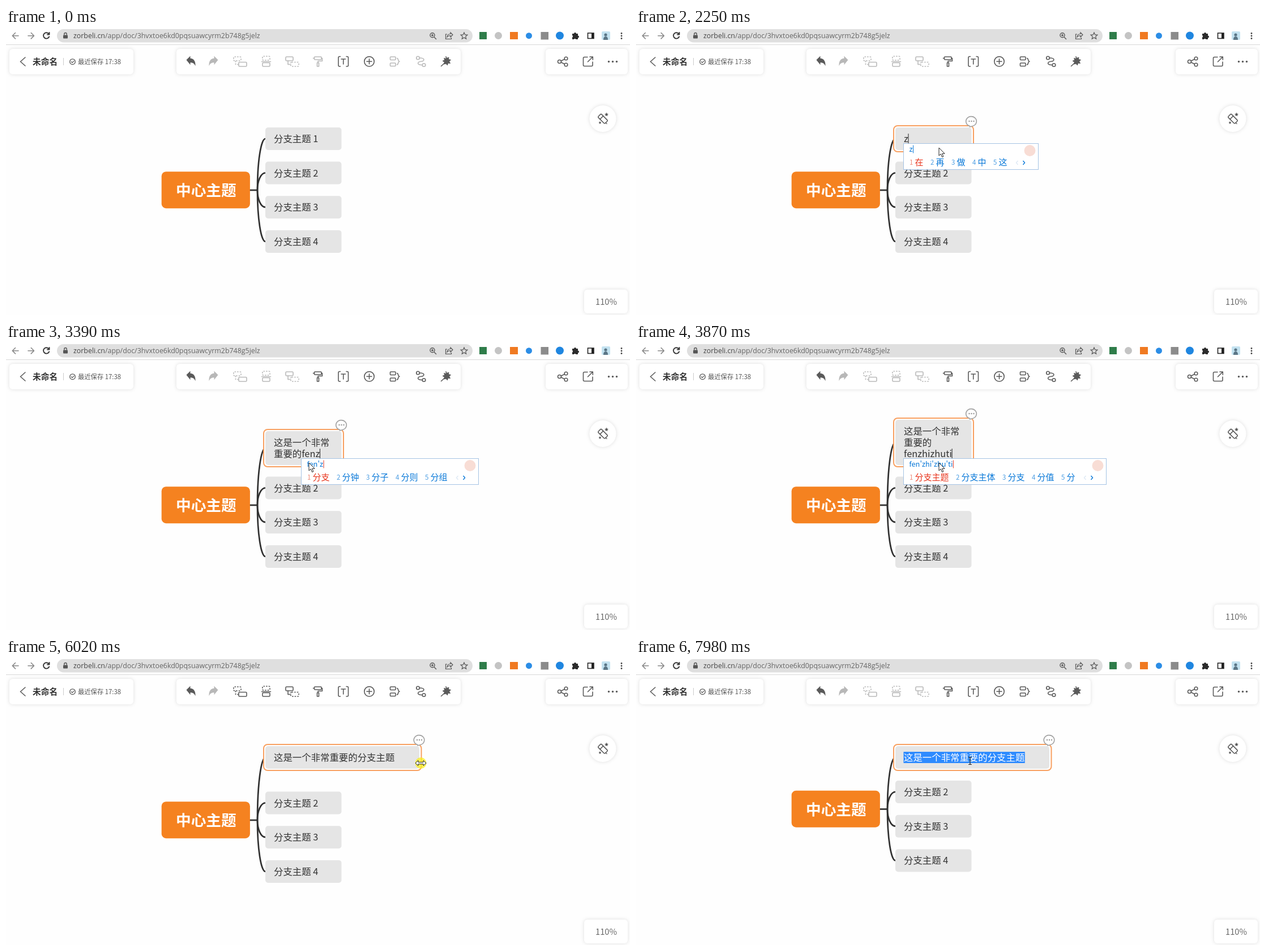
Recreate the animation shown at these times as an HTML page. Size 1102 by 508 pixels, loop 8000 ms.

```html
<!DOCTYPE html>
<html lang="zh-CN">
<head>
<meta charset="utf-8">
<title>Mind map</title>
<style>
html, body { margin: 0; width: 100%; height: 100%; overflow: hidden; background: #fefefe; }
svg { display: block; width: 100%; height: 100%; font-family: "Noto Sans CJK SC", "Noto Sans CJK", sans-serif; font-weight: 350; }
text { white-space: pre; }
.card { fill: #fff; filter: drop-shadow(0 0 3px rgba(0, 0, 0, .13)); }
.ic { fill: none; stroke: #5a5a5a; stroke-width: 1.6; stroke-linecap: round; stroke-linejoin: round; }
.ic .f { fill: #5a5a5a; }
.dim { stroke: #bababa; }
.dim .f { fill: #bababa; }
.dash { stroke-dasharray: 2.6 2; stroke-linecap: butt; }
.nav { stroke-width: 1.6; }
.thin { stroke-width: 1.3; }
</style>
</head>
<body>
<svg viewBox="0 0 1102 508" preserveAspectRatio="none">
  <rect width="1102" height="29" fill="#fff"/>
  <rect y="29" width="1102" height="1" fill="#d8d8d8"/>
  <rect x="90" y="2" width="734" height="23.5" rx="11.7" fill="#dfdfdf"/>
  <g class="ic nav">
    <path stroke="#888" d="M22 13.7H11.5M16.5 8.5l-5.2 5.2 5.2 5.2"/>
    <path stroke="#888" d="M39 13.7h10.5M44.3 8.5l5.2 5.2-5.2 5.2"/>
    <path stroke="#333" stroke-width="1.9" d="M75.5 10.3a5.2 5.2 0 1 0 .7 5M76.5 8v3.6h-3.7"/>
  </g>
  <g fill="none" stroke="#555" stroke-width="1.4">
    <rect x="101" y="12.5" width="8" height="6" fill="#555" stroke="none" rx="1"/>
    <path d="M102.8 12.5v-1.8a2.2 2.2 0 0 1 4.4 0v1.8"/>
    <circle cx="753" cy="12.8" r="4"/>
    <path d="M756 16l4 4M751 12.8h4M753 10.8v4"/>
    <path stroke-width="1.2" d="M779 11h-2.5v8.5h10V17M779 16c.5-4 3-5.5 6-5.5V8l4 4-4 4v-2.5c-2.5 0-4.500.5-6 2.5z"/>
    <path stroke-width="1.2" d="M809 8l1.7 3.900 4.200.4-3.200 2.800 1 4.200-3.700-2.300-3.700 2.300 1-4.200-3.200-2.800 4.200-.4z"/>
  </g>
  <text x="119" y="18" font-size="12.4" font-weight="400" font-family="Open Sans, Noto Sans, sans-serif" fill="#444">zorbeli.cn<tspan fill="#666">/app/doc/3hvxtoe6kd0pqsuawcyrm2b748g5jelz</tspan></text>
  <rect x="836" y="7" width="13" height="13" fill="#2f7d4a"/>
  <circle cx="869.5" cy="13.5" r="6.5" fill="#c4c4c4"/>
  <rect x="890" y="7" width="14" height="13" fill="#f07a22"/>
  <circle cx="923.5" cy="13.7" r="5.5" fill="#2b8de6"/>
  <rect x="944.5" y="7" width="13.5" height="13.5" fill="#8c8c8c"/>
  <circle cx="978" cy="13.5" r="7" fill="#1f86e0"/>
  <path fill="#2b2b2b" d="M1000 10h3a2 2 0 1 1 4 0h3v3.500a2 2 0 1 1 0 4V20h-3.500a2 2 0 0 0-3.500 0h-3v-3.500a2 2 0 0 0 0-3.600z"/>
  <path fill="none" stroke="#222" stroke-width="1.6" d="M1027.5 9h10.5v9.5h-10.5z"/>
  <rect x="1034" y="9" width="4" height="9.5" fill="#222"/>
  <rect x="1052" y="6" width="15" height="15" rx="2" fill="#c3e2f0"/>
  <path fill="#5b7686" d="M1055 21c0-5 2-6 4-6s4 1 4 6z"/><circle cx="1059" cy="12" r="2.6" fill="#5b7686"/>
  <g fill="#444"><circle cx="1087" cy="9.5" r="1.4"/><circle cx="1087" cy="14" r="1.4"/><circle cx="1087" cy="18.5" r="1.4"/></g>

  <g id="map"></g>

  <rect class="card" x="6" y="37" width="219" height="45" rx="6"/>
  <rect class="card" x="301" y="37" width="502" height="45" rx="6"/>
  <rect class="card" x="953" y="37" width="145" height="45" rx="6"/>
  <rect class="card" x="1021" y="463" width="77" height="42" rx="6"/>
  <circle class="card" cx="1054" cy="160.5" r="23.5"/>
  <path class="ic" d="M34 52l-8.5 7.5L34 67"/>
  <text x="47" y="64.5" font-size="14.7" font-weight="700" fill="#333">未命名</text>
  <path stroke="#ccc" d="M101.5 53v13"/>
  <g class="ic thin"><circle cx="117.5" cy="59.7" r="4.8"/><path d="M115.3 59.7l1.7 1.7 3-3"/></g>
  <text x="127" y="63.5" font-size="11.3" fill="#555">最近保存 17:38</text>
  <text x="1060" y="489.5" font-size="14.7" fill="#666" text-anchor="middle">110%</text>

  <path fill="#5a5a5a" d="M318.5 56.5l7-7v4.300c6 .2 9.500 5 9 13.500-2-4.500-4.500-6-9-6v4z"/>
  <path fill="#b8b8b8" d="M374.5 56.5l-7-7v4.300c-6 .2-9.500 5-9 13.500 2-4.500 4.500-6 9-6v4z"/>
  <g class="ic" data-set="insert">
    <rect class="dash" x="402" y="51" width="13" height="7" rx="1.5"/>
    <path class="dash" d="M405.5 58v6.5h6"/><rect x="411" y="60.5" width="14" height="7.5" rx="1.5"/>
    <rect class="dash" x="453" y="50" width="13" height="7" rx="1.5"/>
    <path d="M451.5 59.5h16"/><rect x="453" y="61.5" width="13" height="6.5" rx="1.5"/>
    <rect x="494" y="51" width="13" height="7" rx="1.5"/>
    <path d="M498 58v6.5h4"/><rect class="dash" x="503" y="60.5" width="14" height="7.5" rx="1.5"/>
  </g>
  <g class="ic" data-set="style">
    <rect x="544.5" y="51" width="12.5" height="5" rx="1"/><path d="M544.5 53.5H542.5M557 53.5h1.5v5h-7.5v3"/><rect x="549.5" y="61.5" width="3" height="6.5"/>
    <rect x="678.5" y="51" width="9.5" height="5.5" rx="1"/><rect x="678.5" y="62" width="9.5" height="5.5" rx="1"/>
    <path d="M690.5 53.5c3 0 1 5.7 4.5 5.7-3.5 0-1.5 5.7-4.5 5.7"/>
    <circle cx="727.5" cy="53" r="2.8"/><circle cx="738" cy="65.5" r="2.8"/>
    <path d="M730.5 53c10 0 9 5.8 2.500 6.300s-8.500 6 2 6.200"/>
  </g>
  <g class="ic">
    <path d="M590.5 50.5h-1.5q-2 0-2 2v13.500q0 2 2 2h1.500M601 50.500h1.500q2 0 2 2v13.500q0 2-2 2h-1.500M592 55h7.500M595.750 55v9"/>
    <circle cx="641.5" cy="59.3" r="8.7"/><path d="M637 59.3h9M641.5 54.8v9"/>
    <path d="M768.5 67.5l6-5.5"/>
    <path class="f" stroke-width="1" d="M777 50.5l1.500 3 3.500-1.500-.5 3.500 4 1-3 2.500 2 3.500-4-.5-1 4-2.500-3-3.500 1 .8-3.700-3.300-2 3.700-1.300-1-3.500 3.300 1z"/>
    <circle cx="977.5" cy="59.5" r="3"/><circle cx="989" cy="54" r="2.8"/><circle cx="989" cy="65" r="2.8"/>
    <path d="M980.3 58.2l6-3M980.3 60.8l6 3"/>
    <path d="M1027 51.5h-5.500q-2 0-2 2v12q0 2 2 2h12.500q2 0 2-2V60M1031 51h5.300v5.300M1036 51.300l-8.500 8.500"/>
    <g stroke="none"><circle class="f" cx="1064.5" cy="59.5" r="1.7"/><circle class="f" cx="1071.5" cy="59.5" r="1.7"/><circle class="f" cx="1078.5" cy="59.5" r="1.7"/></g>
    <g transform="rotate(45 1054 160)"><rect x="1046" y="156.5" width="17" height="8" rx="1.5"/><path d="M1051.5 156.5v8"/></g>
    <path class="f" stroke="none" d="M1060.5 149.5l1 2.300 2.400.3-1.800 1.600.5 2.400-2.100-1.200-2.100 1.200.5-2.400-1.800-1.600 2.400-.3zM1049 165l.7 1.600 1.800.2-1.300 1.200.3 1.700-1.500-.8-1.500.8.3-1.700-1.300-1.200 1.800-.2z"/>
    <path class="thin" d="M1059 167.5l2 2"/>
  </g>

  <g id="over"></g>
</svg>
<script>
const LOOP = 8000, FS = 16.42, LEFT = 458, PAD = 15;
const EDIT1 = 1190, PRESS = 5140, DRAG = 5210, DROP = 6220, EDIT2 = 7700;
const DONE = '这是一个非常重要的分支主题';

// start, committed text, pinyin, candidates
const typing = [
  [0, '分支主题 1'],
  [2250, '', 'z', '在 再 做 中 这'],
  [2320, '', 'zh', '这 中 只 着 找'],
  [2380, '', 'zhe', '这 着 者 折 哲'],
  [2450, '', "zhe's", '这是 这事 这时 这 着'],
  [2650, '', "zhe'shi'y", '这是一 这是有 这 着 折'],
  [2720, '', "zhe'shi'yi'ge", '这是一个 这是一 这 着 折'],
  [2920, '这是一个'],
  [2990, '这是一个', 'fei', '非 飞 费 肥 废'],
  [3060, '这是一个', "fei'ch", '非常 肥肠 非常规 飞常 费长'],
  [3120, '这是一个非常'],
  [3190, '这是一个非常', "zhong'y", '重要 中药 中央 中 种'],
  [3260, '这是一个非常', "zhong'yao'de", '重要的 重要得 中药的 重要 中'],
  [3320, '这是一个非常重要的'],
  [3390, '这是一个非常重要的', "fen'z", '分支 分钟 分子 分则 分组'],
  [3470, '这是一个非常重要的', "fen'zhi", '分支 分值 分治 分至 分'],
  [3600, '这是一个非常重要的', "fen'zhi'zh", '分支中 分支 分值 分治 分'],
  [3730, '这是一个非常重要的', "fen'zhi'zhu", '分支主 分支住 分支 分值 分'],
  [3870, '这是一个非常重要的', "fen'zhi'zhu'ti", '分支主题 分支主体 分支 分值 分'],
  [4010, DONE]
];

// start, end, x, y reached
const moves = [
  [70, 850, 538, 212], [1520, 1590, 535, 212], [4670, 5010, 592, 187.5],
  [DRAG, 5410, 645, 187], [5480, 5480, 654, 187], [5680, 6020, 732.5, 186],
  [6290, 6980, 640, 182], [7180, 7380, 590, 182]
];
const presses = [[920, 1060], [1120, 1190], [PRESS, DROP], [7450, 7520], [7590, EDIT2]];

const $ = s => document.querySelector(s);
const pen = document.createElement('canvas').getContext('2d');
const font = '"Noto Sans CJK SC", "Noto Sans CJK", sans-serif';
const width = (s, size = FS) => (pen.font = `350 ${size}px ${font}`, pen.measureText(s).width);
const ease = p => (1 - Math.cos(Math.PI * p)) / 2;
const text = (x, y, s, size = FS, fill = '#333', more = '') =>
  `<text x="${x}" y="${y}" font-size="${size}" fill="${fill}" ${more}>${s}</text>`;
const rect = (x, y, w, h, fill, more = '') =>
  `<rect x="${x}" y="${y}" width="${w}" height="${h}" fill="${fill}" ${more}/>`;

function pointer(t) {
  let x = 1026, y = 508;
  for (const [a, b, nx, ny] of moves) {
    if (t < a) break;
    const n = Math.max(1, Math.round((b - a) / 67) + 1);
    const k = b > a ? Math.min(n, Math.floor((t - a) * (n - 1) / (b - a)) + 1) : n;
    const p = ease(k / n);
    x += (nx - x) * p;
    y += (ny - y) * p;
  }
  return { x, y };
}

function wrap(s, limit) {
  const lines = [''];
  for (const word of s.match(/[a-z0-9]+|[^a-z0-9]/g) || []) {
    const last = lines.length - 1;
    if (lines[last] && width(lines[last] + word) > limit) lines.push(word);
    else lines[last] += word;
  }
  return lines;
}

const link = (cy, y) =>
  `<path d="M444 ${cy}A14 ${Math.abs(y - cy)} 0 0 ${y < cy ? 1 : 0} 458 ${y}" fill="none" stroke="#303030" stroke-width="2.7"/>`;

function bubble(x, y) {
  const dots = [-4, 0, 4].map(d => `<circle cx="${x + d}" cy="${y}" r="1.2" fill="#999"/>`).join('');
  return `<path d="M${x - 3} ${y + 8.5}A9.3 8.6 0 1 1 ${x + 3} ${y + 8.2}L${x - 3} ${y + 10}z" fill="#fff" stroke="#a3a3a3" stroke-width="1.7" stroke-linejoin="round"/>` + dots;
}

function panel(x, y, py, list) {
  const cands = list.split(' ');
  const w = 163 + list.replace(/ /g, '').length * 15;
  const caret = x + 10.5 + width(py, 12.8);
  let cx = x + 10.5;
  let out = rect(x, y, w, 46, '#fff', 'stroke="#a5c3e4"') +
    `<circle cx="${x + w - 15}" cy="${y + 12.5}" r="10" fill="#f8ddd5"/>` +
    text(x + 10, y + 14.5, py, 12.8, '#0878d8') +
    rect(caret, y + 3, 1, 14, cands[0].length > 1 ? '#e33a28' : '#0878d8');
  cands.forEach((c, i) => {
    out += text(cx, y + 37, i + 1, 11.5, i ? '#4c9de2' : '#ee8a78') +
      text(cx + 9.5, y + 38, c, 15, i ? '#0878d8' : '#e8341c');
    cx += 22 + c.length * 15;
  });
  const end = x + w - 26;
  return out + `<path d="M${end - 10} ${y + 30.5}l-3 3.5 3 3.5" fill="none" stroke="#dce8f4" stroke-width="1.3"/>` +
    `<path d="M${end - 1} ${y + 30.5}l3 3.5-3 3.5" fill="none" stroke="#0878d8" stroke-width="1.4"/>`;
}

function cursor(kind, x, y) {
  const look = 'fill="#fff" stroke="#222" stroke-linejoin="round"';
  const shapes = {
    arrow: `<path d="M0 0v14l3.300-3 2.300 5.500 2.300-1-2.300-5.200h4.500z" ${look}/>`,
    size: `<path d="M-9.5 0l5-4.500v3h9v-3l5 4.500-5 4.500v-3h-9v3z" ${look}/>`,
    beam: '<path d="M-3-6.500h2q1 0 1 1 0-1 1-1h2M0-5.500v11M-3 6.500h2q1 0 1-1 0 1 1 1h2" fill="none" stroke="#222" stroke-width="1.2"/>'
  };
  return `<g transform="translate(${x} ${y})">${shapes[kind]}</g>`;
}

function scene(t) {
  const p = pointer(t);
  const [, done, py, cands] = typing.filter(s => s[0] <= t).pop();
  const right = t < DRAG ? 592.5 : t < DROP ? p.x - 2.5 : 730;
  const limit = right - PAD - LEFT - PAD;
  const lines = wrap(done + (py || '').replace(/'/g, ''), limit);
  const h = 20 + 20 * lines.length;
  const top = t < DRAG ? 216 - h : 176 - h / 2;
  const shift = t < DROP ? 0 : -19.5;
  const cy = 287 + shift;
  const tx = LEFT + PAD;
  const marked = (t >= EDIT1 && t < 2250) || t >= EDIT2;

  let map = `<path d="M430 ${cy}h15" stroke="#303030" stroke-width="2.7"/>` + link(cy, top + h / 2);
  for (let i = 0; i < 3; i++) {
    const y = 236.5 + 60.7 * i + shift;
    map += link(cy, y + 20) + rect(LEFT, y, 134.5, 40, '#e5e5e5', 'rx="5"') +
      text(tx, y + 26, '分支主题 ' + (i + 2));
  }
  map += rect(274.7, 254.2 + shift, 156.2, 65, '#f58220', 'rx="8"') +
    text(300, 297 + shift, '中心主题', 26.7, '#fff', 'font-weight="700"');
  if (t >= 780) {
    map += rect(LEFT - 3, top - 3, right - LEFT + 6.5, h + 6, '#fff',
      `rx="7" stroke="${t < 990 ? '#fbcbaa' : '#f8a061'}" stroke-width="2"`);
  }
  map += rect(LEFT, top, right - LEFT, h, '#e5e5e5', 'rx="5"');
  lines.forEach((s, i) => {
    const y = top + 20 * i;
    if (marked) map += rect(tx - .5, y + 10, width(s) + 1, 20, '#2e8bff');
    map += text(tx, y + 26, s, FS, marked ? '#fff' : '#333');
  });
  const tail = lines[lines.length - 1];
  if (t >= 2250 && t < 4470) map += rect(tx + width(tail) - .3, top + h - 29, 1, 17, '#222');
  if (t >= 780) map += bubble(right, top - 11);

  let over = '';
  if (py) {
    const start = tx + width(tail) - width(py.replace(/'/g, ''));
    over += panel(Math.round(start) - .5, 204.5, py, cands);
  }
  if (presses.some(([a, b]) => t >= a && t < b))
    over += `<circle cx="${p.x}" cy="${p.y}" r="10" fill="#f8ee20" opacity=".75"/>`;
  const kind = t >= EDIT2 ? 'beam' : t >= 4940 && t < 6290 ? 'size' : 'arrow';
  if (t >= 70) over += cursor(kind, p.x, p.y);

  return {
    map, over,
    insert: (t >= 990 && t < EDIT1) || (t >= PRESS && t < EDIT2),
    style: t >= 990
  };
}

let prev = {};
function draw() {
  const s = scene(performance.now() % LOOP);
  for (const id of ['map', 'over']) if (s[id] !== prev[id]) $('#' + id).innerHTML = s[id];
  for (const set of ['insert', 'style']) $(`[data-set=${set}]`).classList.toggle('dim', !s[set]);
  prev = s;
  requestAnimationFrame(draw);
}
draw();
</script>
</body>
</html>
```
